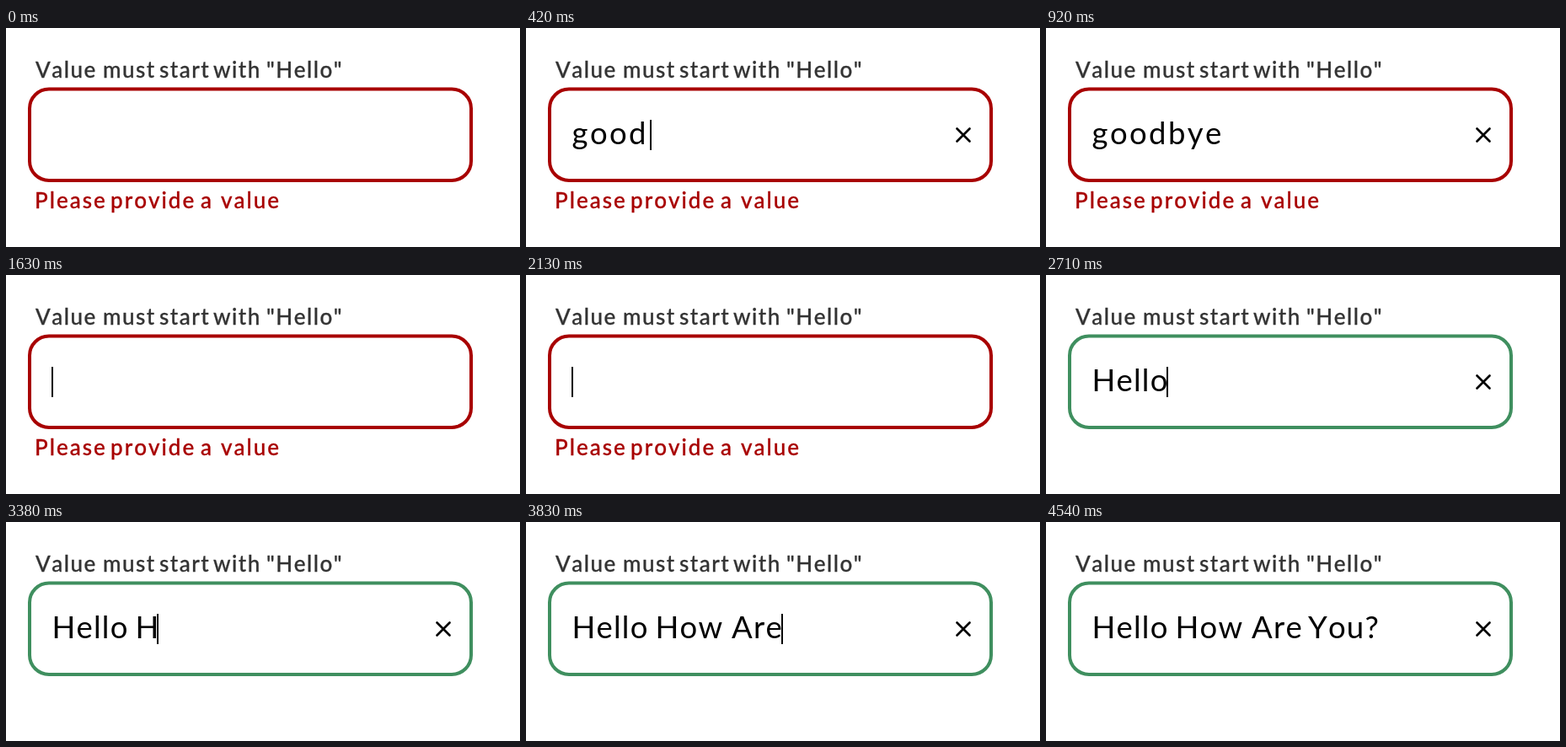
An HTML page for the animation above (4680 ms loop, 610 px wide and 260 px high).

```html
<!DOCTYPE html>
<html lang="en">
<head>
<meta charset="utf-8">
<title>Input validation</title>
<style>
  html, body { margin: 0; width: 100%; height: 100%; overflow: hidden; background: #fff; }
  svg { display: block; width: 610px; height: 260px; }
  text { font-family: Lato, "Open Sans", sans-serif; font-kerning: none; white-space: pre; }
  .small { font-size: 26px; font-weight: 500; stroke-width: 0.3px; }
  #label { fill: #333; stroke: #333; letter-spacing: 1.5px; }
  #error { fill: #a80000; stroke: #a80000; letter-spacing: 2px; }
  #value { font-size: 36.5px; letter-spacing: 1.2px; }
</style>
</head>
<body>
<svg viewBox="0 0 610 260">
  <text id="label" class="small" y="59"></text>
  <rect id="box" x="28" y="72.5" width="524" height="108.5" rx="23" fill="#fff" stroke-width="4"/>
  <circle id="disc" cx="519" cy="127" r="17" fill="#e4e4e4"/>
  <path id="clear" d="M511.5 119.5L526.5 134.5M526.5 119.5L511.5 134.5"
        stroke="#000" stroke-width="2.7" stroke-linecap="round" fill="none"/>
  <text id="value" y="137.5"></text>
  <rect id="caret" y="109" width="2" height="36"/>
  <text id="error" class="small" y="214"></text>
</svg>
<script>
const LOOP = 4680;
const RED = "#a80000", GREEN = "#3f8f5f";
const OFF = null;
const $ = id => document.getElementById(id);

// time, field value, caret x
const steps = [
  [0, "", OFF],
  [170, "g", 77], [250, "go", 100], [330, "goo", 123], [420, "good", 147],
  [500, "goodb", 171], [580, "goodby", 189], [670, "goodbye", 208],
  [920, "goodbye", OFF],
  [1290, "", OFF], [1630, "", 54], [1880, "", OFF], [2130, "", 54],
  [2210, "H", 82], [2290, "He", 102], [2380, "Hel", 112],
  [2460, "Hell", 121], [2500, "Hello", 143],
  [2880, "Hello ", 151], [3130, "Hello ", OFF],
  [3380, "Hello H", 179], [3460, "Hello How", 233], [3500, "Hello How ", 241],
  [3670, "Hello How A", 268], [3830, "Hello How Are", 303], [3880, "Hello How Are ", 311],
  [4040, "Hello How Are Y", 331], [4130, "Hello How Are Yo", 353],
  [4210, "Hello How Are You", 374], [4330, "Hello How Are You?", 393],
  [4540, "Hello How Are You?", OFF]
];

// time, strength of the highlight behind the clear button
const highlight = [[0, 0], [1000, 0.5], [1040, 1], [1290, 0.5], [1330, 0]];

const at = (list, t) => list.findLast(entry => entry[0] <= t);

function setWords(el, str, xs) {
  el.innerHTML = str.split(" ")
    .map((word, i) => `<tspan x="${xs[i]}">${word}</tspan>`)
    .join("");
}

const show = (id, on) => $(id).setAttribute("visibility", on ? "visible" : "hidden");

setWords($("label"), 'Value must start with "Hello"', [35, 115, 182, 246, 309]);
setWords($("error"), "Please provide a value", [34, 124, 231, 255]);

let shown = null;

function draw(t) {
  const [, value, caret] = at(steps, t);
  const valid = value.startsWith("Hello");

  if (value !== shown) {
    setWords($("value"), value, [54.5, 153.5, 244, 311]);
    $("value").style.letterSpacing = value.startsWith("g") ? "2.4px" : "1.2px";
    shown = value;
  }
  $("box").setAttribute("stroke", valid ? GREEN : RED);
  $("disc").setAttribute("opacity", at(highlight, t)[1]);
  $("caret").setAttribute("x", caret ?? 0);
  show("caret", caret !== OFF);
  show("clear", value !== "");
  show("error", !valid);
}

const start = performance.now();
function tick() {
  draw((performance.now() - start) % LOOP);
  requestAnimationFrame(tick);
}
tick();
</script>
</body>
</html>
```
